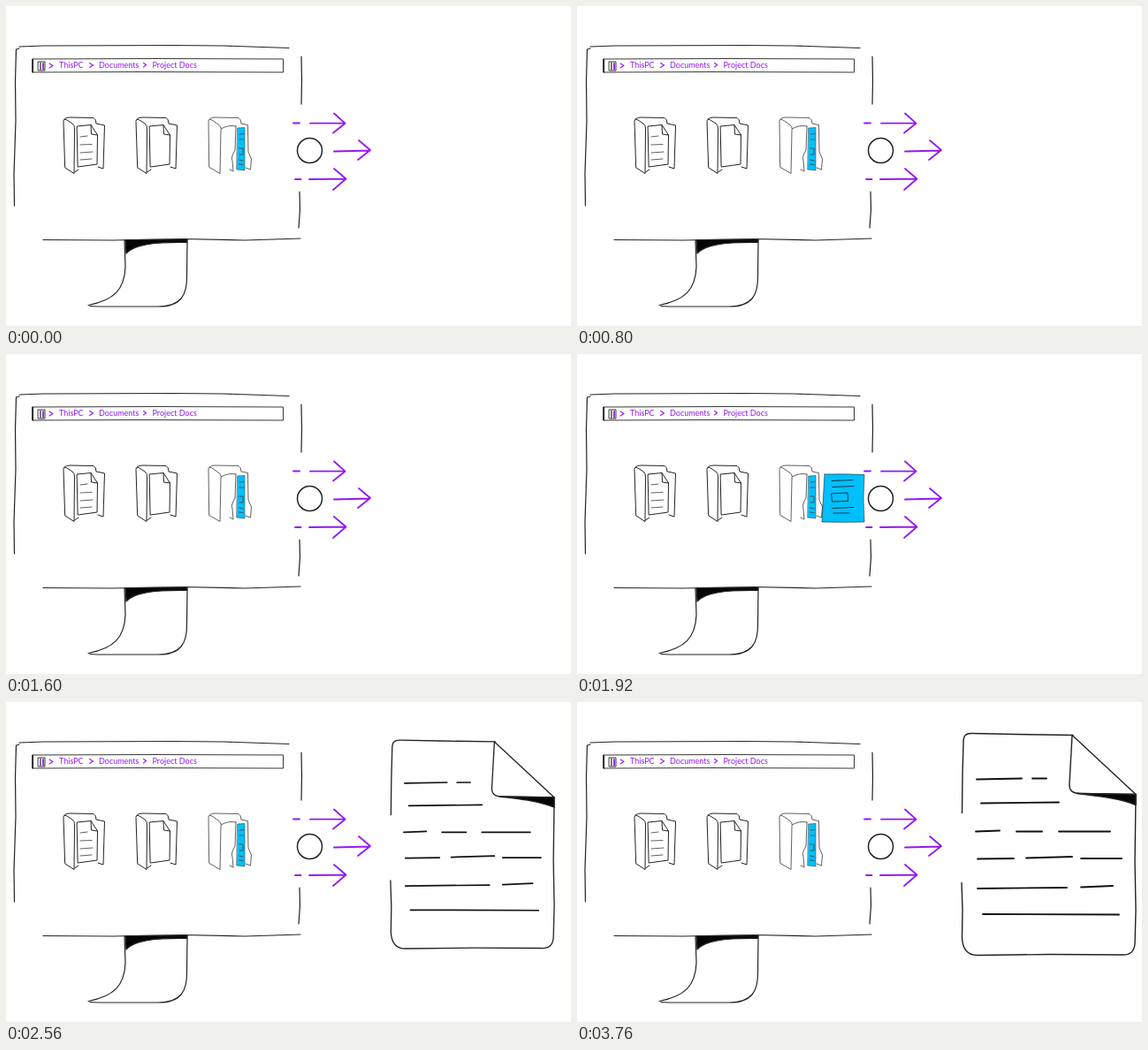
An HTML page for the animation above (3.84 s loop, 639x362 px).

```html
<!DOCTYPE html>
<html lang="en">
<head>
<meta charset="utf-8">
<title>Files to document</title>
<style>
  html, body { margin: 0; width: 100%; height: 100%; overflow: hidden; background: #fff; }
  svg { display: block; width: 639px; height: 362px; }
  path, circle { fill: none; stroke: #222; stroke-linecap: round; stroke-linejoin: round; }
  text { font: 9px Lato, sans-serif; fill: #9019ee; }
  .frame path { stroke-width: 1.2; }
  .frame path.thin { stroke-width: .9; }
  .folder path { stroke: #444; stroke-width: .85; }
  .purple path { stroke: #9419f0; stroke-width: 1.8; }
  .purple path.thin { stroke-width: 1.1; }
  #sheet path { stroke: #123; stroke-width: .9; }
  #doc path { stroke-width: 1.4; }
  #doc path.text { stroke: #111; stroke-width: 1.8; }
  path.ink { fill: #050505; }
  .folder path.page { fill: #fff; }
  .folder path.blue, #sheet path.blue { fill: #00c0fc; stroke-width: .6; }
</style>
</head>
<body>
<svg viewBox="0 0 639 362">
  <g class="frame">
    <path d="M15 46L42 45L190 44.500L246 45L320 47.500"/>
    <path d="M15 48L11.500 49L10.500 85L11 130L9 190L9.500 226"/>
    <path d="M334 57L334.500 85L334 111M332 210L332.500 230L331 251"/>
    <path d="M42 264.500L120 265L200 263.500L270 265L333 263"/>
    <path d="M134 265L135 295C134 321 122 333 93 338.500M95 339.500L104 340L172 340C198 340 205 327 204.500 305L205 265"/>
    <path class="ink" d="M135 264.500L205 264L204.500 267.500C166 267 144 270 136 280Z"/>
    <path class="thin" d="M30 60L170 59.500L313.500 60L313.500 75L150 74.500L30 75Z"/>
    <path d="M30.500 60L30.500 75"/>
    <path class="thin" d="M36.500 63L44 63L44 73L36.500 73Z"/>
    <path d="M39 64L39 72"/>
  </g>

  <g class="purple">
    <path d="M42 65L42 71.500"/>
    <path class="thin" d="M49 65L53 67.500L49 70M94.500 64.500L98.500 67L94.500 69.500M155.500 64.500L158.500 66.500L155.500 69"/>
    <path d="M325 132.500L332 132.500M344 132.700L383 132.700M371 121.500L383.500 132.700L370 143.500"/>
    <path d="M371 164.500L411 163.500M399 152L412 163L398 174"/>
    <path d="M327 196L333.500 196M343 196L384 195.500M371 184L384.500 195.500L370 208"/>
  </g>
  <text x="60" y="70">ThisPC</text>
  <text x="105" y="70">Documents</text>
  <text x="165.500" y="70">Project Docs</text>

  <defs>
    <g id="cover">
      <path d="M2 3Q4 1 8 1L35 1.500Q38 3 38 8L47.500 10L46 59L40 57"/>
      <path class="page" d="M1 5Q1 2 5 4L11 8Q14 10 13.500 15L13 64.500L3 58Z"/>
      <path d="M13.500 63L18 60"/>
    </g>
    <g id="leaf">
      <path class="page" d="M16.500 11L32 9.500L39.500 21L39 54L17.500 57Z"/>
      <path d="M32 9.500L32.500 20L39.500 21"/>
    </g>
  </defs>
  <g class="folder" transform="translate(64 125)">
    <use href="#cover"/><use href="#leaf"/>
    <path d="M20 23L28 22M20 32L33 31.500M20 41L34 40M20 49L33 48"/>
  </g>
  <g class="folder" transform="translate(146 125)">
    <use href="#cover"/><use href="#leaf"/>
  </g>
  <g class="folder" transform="translate(228 125)">
    <path d="M2 3Q4 1 8 1L35 1.500Q38 3 38 8L45.500 9.500L46 40L49.500 48L48.500 60L43 58"/>
    <path class="blue" d="M34 13L42 12.500L42 61L33 60Z"/>
    <path d="M36 20L41 19.500M36 26L41 26M35.500 36L40 36L40 43L36 43M35.500 49L40 50M35.500 54L40 54.500"/>
    <path d="M32 11L31 38Q26 46 28 50L29 62L25 60M15 14Q24 9 32 11"/>
    <path class="page" d="M1 5Q1 2 5 4L12 9Q16 11 15 16L14 64.500L2 57.500Z"/>
  </g>

  <circle cx="343.500" cy="163.500" r="14" style="stroke-width:1.5"/>

  <g id="sheet">
    <path id="paper" class="blue"/>
    <path d="M10 8.500L34 7.500M11 15.500L35 14.500M10 23L28 22L28.500 31.500L11 32ZM11 39.500L35 38.500M12 45L30 45"/>
  </g>

  <!-- Origin: middle of the left edge -->
  <g id="doc">
    <path d="M.500 -35L1 -78L2 -115C2 -123 5 -125 11 -125L60 -124L126 -123"/>
    <path d="M125 -123L122 -69C121 -60 126 -57 134 -57L197 -56Z"/>
    <path class="ink" d="M131 -57L197 -56L197 -44C178 -52 154 -54 131 -57Z"/>
    <path d="M197 -56L196 20L197 75L196 113C195 122 191 126 181 125.500L100 125L18 126C7 126 1 119 .500 106L1 75L0 44"/>
    <path class="text" d="M17 -73L68 -74M80 -74L96 -74M22 -46L110 -47M16 -14L43 -15M62 -14L91 -14M110 -14L168 -14
      M18 17L59 16.500M73 16L125 14.500M135 16.500L181 16.500M18 50.500L119 49.500M135 49L171 47.500M24 79.500L178 80"/>
  </g>
</svg>
<script>
const LOOP = 3840, STEP = 80, CYCLE = 800, SHEETS = 3, GROW = 2240;
const [sheet, paper, doc] = ['sheet', 'paper', 'doc'].map(id => document.getElementById(id));

// phase, x, bend, opacity
const slide = [
  [200, 264, 0, 0], [240, 268, 0, .7], [320, 278, 1, 1], [400, 296, 3, 1], [480, 315, 5, 1],
  [560, 326, 6, .85], [640, 333, 7, .5], [720, 336, 7, .2], [800, 338, 7, 0]
];
// time, scale
const grow = [
  [2240, .24], [2320, .45], [2400, .66], [2480, .83], [2560, .94],
  [2640, .99], [2720, 1.012], [2800, 1.007], [2880, 1]
];

function sample(rows, t) {
  const i = rows.findIndex(r => r[0] >= t);
  if (i < 0) return rows[rows.length - 1].slice(1);
  if (i === 0) return rows[0].slice(1);
  const a = rows[i - 1], b = rows[i], k = (t - a[0]) / (b[0] - a[0]);
  return a.slice(1).map((v, j) => v + (b[j + 1] - v) * k);
}

function draw(t) {
  const [x, bend, alpha] = t < CYCLE * SHEETS ? sample(slide, t % CYCLE) : [0, 0, 0];
  sheet.setAttribute('transform', `translate(${x} 135)`);
  sheet.setAttribute('opacity', alpha);
  paper.setAttribute('d',
    `M2 1Q24 ${bend * .4} 47 1.5Q${47 - 2 * bend} 28 47 55Q24 ${56 - bend * .4} -1 55Q${bend * .4} 28 2 1Z`);

  const [size] = sample(grow, t);
  doc.setAttribute('visibility', t < GROW ? 'hidden' : 'visible');
  doc.setAttribute('transform', `translate(${433 + 2 * size} ${161.5 - size}) scale(${size})`);
}

function tick(now) {
  draw(Math.floor(now % LOOP / STEP) * STEP);
  requestAnimationFrame(tick);
}
draw(0);
requestAnimationFrame(tick);
</script>
</body>
</html>
```
